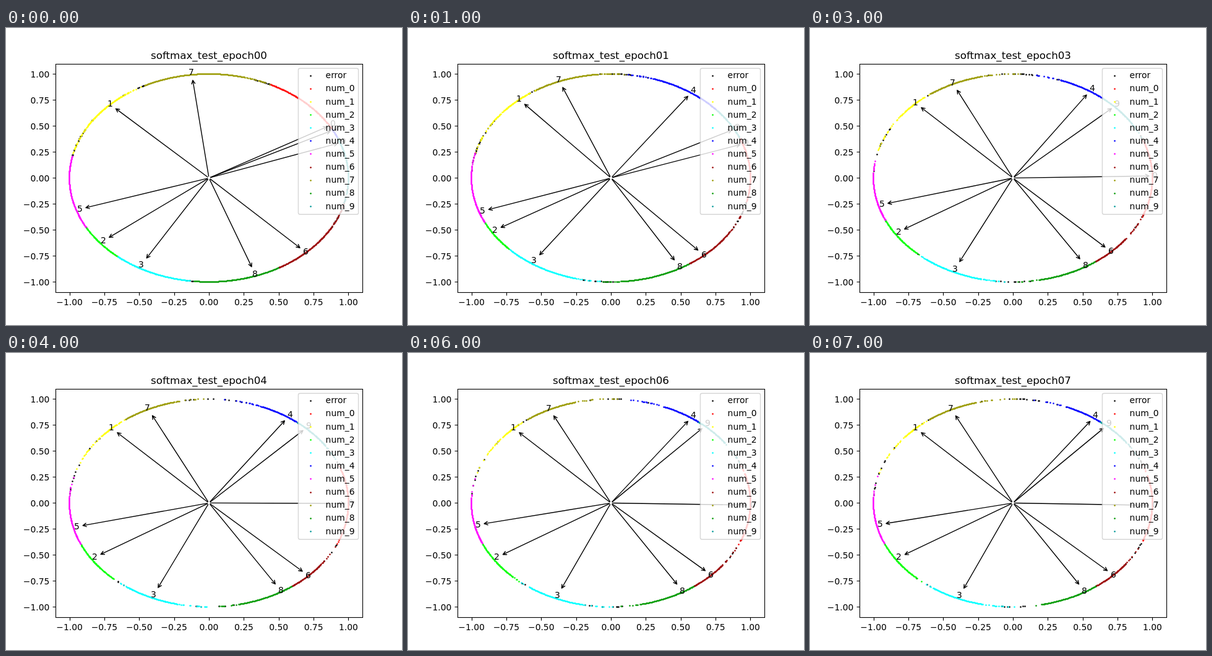
An HTML page for the animation above (8000 ms loop, 640 px wide and 480 px high).

```html
<!DOCTYPE html>
<html lang="en">
<head>
<meta charset="utf-8">
<title>Softmax test</title>
<style>
html, body { margin: 0; width: 100%; height: 100%; overflow: hidden; background: #fff; }
svg { display: block; }
text { font: 13.89px "DejaVu Sans", sans-serif; }
.title { font-size: 16.67px; text-anchor: middle; }
.mid { text-anchor: middle; }
.end { text-anchor: end; }
.line { fill: none; stroke: #000; stroke-width: 1.11; }
.arrow { fill: none; stroke: #000; stroke-width: 1.39; stroke-linecap: round; stroke-linejoin: round; }
.dots { fill: none; stroke-width: 2.7; stroke-linecap: round; }
.epoch { visibility: hidden; animation: show 8s step-end infinite; }
@keyframes show {
  0% { visibility: visible; }
  12.5%, 100% { visibility: hidden; }
}
</style>
</head>
<body>
<svg id="plot" width="640" height="480" viewBox="0 0 640 480"></svg>
<script>
const CX = 328, CY = 242.4, RX = 225.45, RY = 168;

// way: direction in degrees at epochs 0, 1, 2 and where it settles.
// spread: half-width of the tight cluster around that direction.
const DIGITS = [
  { color: '#f00', spread: 18, way: [29.6, 18.2, 3, -2.8] },
  { color: '#ff0', spread: 4, way: [136.8, 132.8, 135.9, 135.9] },
  { color: '#0f0', spread: 12, way: [219, 211.7, 212.4, 213.2] },
  { color: '#0ff', spread: 11, way: [239.6, 235.2, 241.5, 246.4] },
  { color: '#00f', spread: 11, way: [26.7, 55.1, 59, 54.9] },
  { color: '#f0f', spread: 16, way: [198.9, 200, 200, 193.2] },
  { color: '#900', spread: 9, way: [312.4, 310.2, 311.4, 314.4] },
  { color: '#990', spread: 12, way: [98.3, 113.2, 116, 117.7] },
  { color: '#090', spread: 16, way: [288.2, 298.3, 300.6, 299.5] },
  { color: '#099', spread: 12, way: [18.9, 27.3, 37.3, 48] }
];

const svg = document.getElementById('plot');

function add(parent, tag, attrs, text) {
  const el = document.createElementNS('http://www.w3.org/2000/svg', tag);
  for (const k in attrs) el.setAttribute(k, attrs[k]);
  if (text !== undefined) el.textContent = text;
  parent.appendChild(el);
  return el;
}

function random(seed) {
  return () => {
    seed = (seed * 1664525 + 1013904223) % 4294967296;
    return seed / 4294967296;
  };
}

function direction({ way }, n) {
  if (n < 3) return way[n];
  return way[3] + (way[2] - way[3]) * Math.exp(-0.8 * (n - 2));
}

function onRing(deg) {
  const a = deg * Math.PI / 180;
  return [CX + RX * Math.cos(a), CY - RY * Math.sin(a)];
}

const snap = v => Math.floor(v) + 0.5;
const dot = (x, y) => `M${snap(x)} ${snap(y)}h0`;

function drawRing(g, n) {
  const rnd = random(n * 977 + 41);
  const early = Math.exp(-0.6 * n);
  const density = 1 + 3 * early;
  const ring = DIGITS
    .map(d => ({ color: d.color, reach: d.spread * (1 + 0.9 * early), deg: direction(d, n), hits: '' }))
    .sort((a, b) => a.deg - b.deg);
  let errors = '';

  // A class owns the ring up to halfway to its neighbour: solid near its direction, then thinning into errors.
  function fill(c, half, side) {
    const solid = Math.min(half, c.reach);
    for (let a = 0; a < solid; a += 0.25) c.hits += dot(...onRing(c.deg + side * a));
    const tail = half - solid;
    for (let k = 0; k < tail * density; k++) {
      const u = rnd();
      const p = dot(...onRing(c.deg + side * (solid + tail * Math.pow(u, 1.4))));
      if (rnd() < 0.05 + 0.7 * u * u) errors += p;
      else c.hits += p;
    }
  }

  ring.forEach((c, i) => {
    const next = ring[(i + 1) % 10];
    const half = ((next.deg - c.deg + 360) % 360) / 2;
    fill(c, half, 1);
    fill(next, half, -1);
  });
  add(g, 'path', { class: 'dots', stroke: '#000', d: errors });
  for (const c of ring) add(g, 'path', { class: 'dots', stroke: c.color, d: c.hits });
}

function drawArrow(g, deg, digit) {
  const [left, base] = onRing(deg);
  const tx = left + 4.4, ty = base - 4;
  const len = Math.hypot(CX - tx, CY - ty);
  const ux = (CX - tx) / len, uy = (CY - ty) / len;
  const edge = Math.min(7.2 / Math.abs(ux), 9.6 / Math.abs(uy)) + 2.8;
  const x = tx + ux * edge, y = ty + uy * edge;
  const barb = s => [x + 5.56 * ux - s * 2.78 * uy, y + 5.56 * uy + s * 2.78 * ux];
  add(g, 'path', {
    class: 'arrow',
    d: `M${CX - ux * 2.8} ${CY - uy * 2.8}L${x} ${y}M${barb(1)}L${x} ${y}L${barb(-1)}`
  });
  add(g, 'text', { x: Math.round(left), y: Math.round(base) }, digit);
}

function drawAxes() {
  add(svg, 'rect', { class: 'line', x: 80.5, y: 58.5, width: 496, height: 369 });
  for (let i = -4; i <= 4; i++) {
    const v = i / 4;
    const label = (v < 0 ? '\u2212' : '') + Math.abs(v).toFixed(2);
    const x = CX + v * RX, y = CY - v * RY;
    add(svg, 'path', { class: 'line', d: `M${Math.round(x) + 0.5} 427.5v4.9M80.5 ${snap(y)}h-4.9` });
    add(svg, 'text', { class: 'mid', x, y: 448 }, label);
    add(svg, 'text', { class: 'end', x: 70.3, y: Math.round(y + 5.3) }, label);
  }
}

function drawLegend() {
  add(svg, 'rect', {
    x: 472.4, y: 65.2, width: 97.2, height: 236, rx: 2.8,
    fill: '#fff', stroke: '#ccc', 'stroke-width': 1.39, opacity: 0.8
  });
  ['#000', ...DIGITS.map(d => d.color)].forEach((color, i) => {
    const y = 77.2 + 21.13 * i;
    add(svg, 'path', { class: 'dots', stroke: color, d: dot(492.3, y) });
    add(svg, 'text', { x: 516.6, y: Math.round(y + 4.1) }, i ? 'num_' + (i - 1) : 'error');
  });
}

for (let n = 0; n < 8; n++) {
  const g = add(svg, 'g', { class: 'epoch', style: `animation-delay:${n - 8}s` });
  drawRing(g, n);
  DIGITS.forEach((d, digit) => drawArrow(g, direction(d, n), digit));
  add(g, 'text', { class: 'title', x: CX, y: 50 }, 'softmax_test_epoch0' + n);
}
drawAxes();
drawLegend();
</script>
</body>
</html>
```
